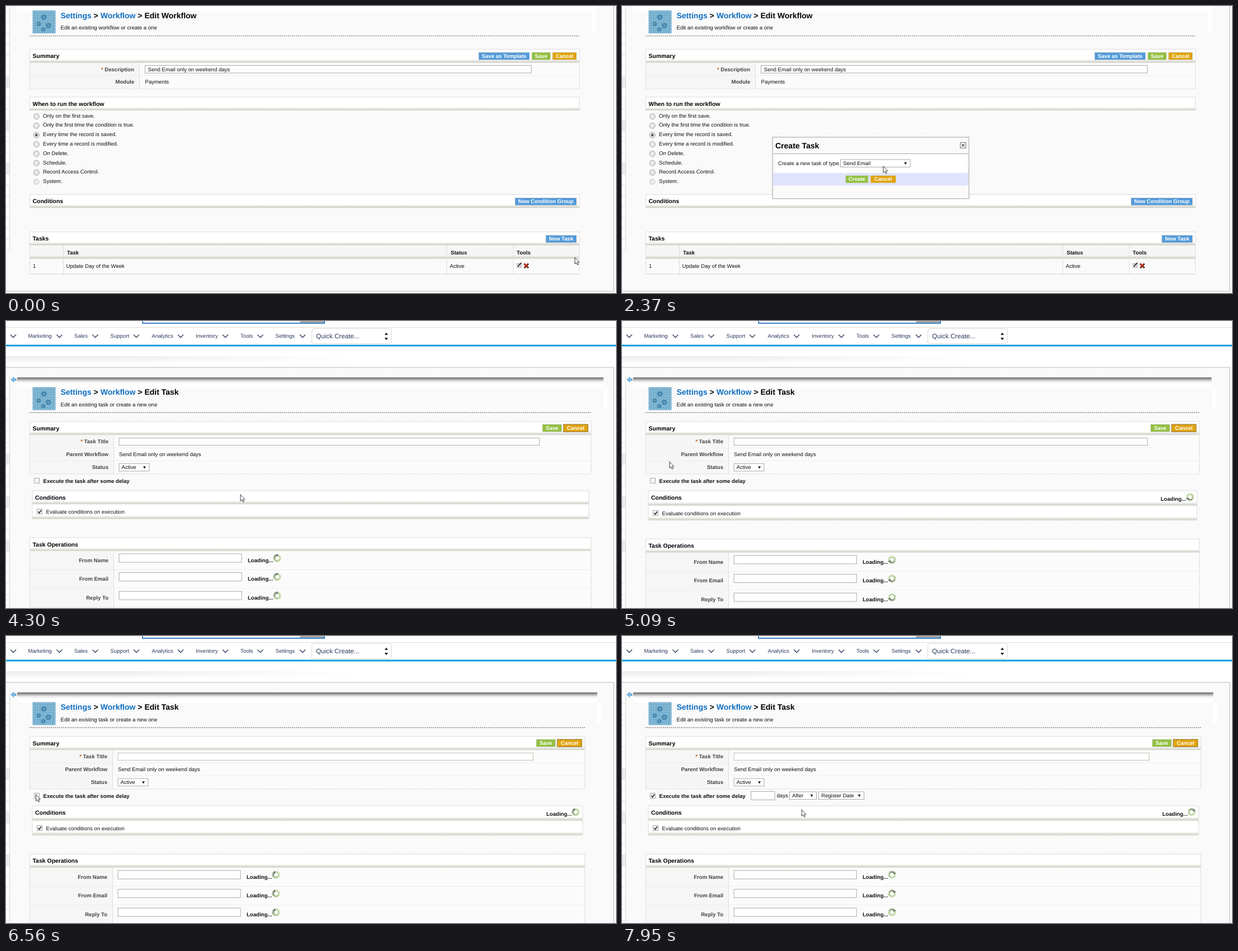
Write an HTML page that moves like this. It is 1090 px wide and 514 px high and loops after 8000 ms.

```html
<!DOCTYPE html>
<html lang="en">
<head>
<meta charset="utf-8">
<title>Workflow editor</title>
<style>
html, body { margin: 0; width: 100%; height: 100%; overflow: hidden; background: #fff; }
svg { display: block; width: 1090px; height: 514px; }
text { font: 9.6px "Liberation Sans", Arial, sans-serif; fill: #111; text-rendering: geometricPrecision; white-space: pre; }
.b { font-weight: bold; }
.h { font-weight: bold; font-size: 10.48px; fill: #000; }
.t { font-weight: bold; font-size: 14px; fill: #000; }
.link { fill: #0f6fc0; }
.lab { font-weight: bold; fill: #444; text-anchor: end; }
.btn { font-weight: bold; fill: #fff; text-anchor: middle; }
.nav { fill: #2b3a5c; }
.quick { font-size: 11.64px; fill: #2b3a5c; }

.anim > *, .on { animation: 8s step-end infinite; }
#flow { animation-name: flow; }
#task { animation-name: task; }
#dialog { animation-name: dialog; }
#menu { animation-name: menu; }
#fade { animation-name: fade; }
#wide { animation-name: wide; }
#narrow { animation-name: narrow; }
#final { animation-name: final; }
#delay { animation-name: delay; }
#cursor { animation: cursor 8s step-end infinite; }
.spin { animation: spin 1142.857ms steps(12) -271.43ms infinite; }

@keyframes flow { 0% { opacity: 1 } 53.75%, 100% { opacity: 0 } }
@keyframes task { 0% { opacity: 0 } 53.75%, 100% { opacity: 1 } }
@keyframes dialog { 0% { opacity: 0 } 9.5%, 100% { opacity: 1 } }
@keyframes menu { 0% { opacity: 0 } 21% { opacity: 1 } 26.75%, 100% { opacity: 0 } }
@keyframes fade { 0% { opacity: 0 } 38.25% { opacity: .12 } 39.5%, 100% { opacity: .25 } }
@keyframes wide { 0% { opacity: 1 } 56.625%, 100% { opacity: 0 } }
@keyframes narrow { 0% { opacity: 0 } 56.625% { opacity: 1 } 64.625%, 100% { opacity: 0 } }
@keyframes final { 0% { opacity: 0 } 64.625%, 100% { opacity: 1 } }
@keyframes delay { 0% { opacity: 0 } 86.875%, 100% { opacity: 1 } }
@keyframes spin { to { transform: rotate(360deg) } }
@keyframes cursor {
  0% { transform: translate(1016px, 450px) }
  .875% { transform: translate(1016px, 450px); animation-timing-function: steps(4, jump-start) }
  4.375% { transform: translate(995px, 419px) }
  5.625% { transform: translate(994.5px, 419px) }
  11.375% { transform: translate(994.5px, 419px); animation-timing-function: steps(8, jump-start) }
  19.09% { transform: translate(480px, 279.5px) }
  28.625% { transform: translate(480px, 279.5px); animation-timing-function: steps(9, jump-start) }
  37.34% { transform: translate(418.5px, 310.5px) }
  54.74% { transform: translate(418.5px, 310.5px); animation-timing-function: steps(10, jump-start) }
  64.625% { transform: translate(84.5px, 251.5px); animation-timing-function: steps(6, jump-start) }
  70.5% { transform: translate(33px, 268px); animation-timing-function: steps(5, jump-start) }
  75.25% { transform: translate(48px, 283.5px); animation-timing-function: steps(3, jump-start) }
  78.25% { transform: translate(53px, 283.5px) }
  96.5% { transform: translate(53px, 283.5px); animation-timing-function: steps(4, jump-start) }
  100% { transform: translate(320.5px, 310.5px) }
}
</style>
</head>
<body>
<svg viewBox="0 0 1090 514">
  <defs>
    <pattern id="hatch" width="3.5" height="3.5" patternUnits="userSpaceOnUse">
      <rect width="3.5" height="3.5" fill="#fcfcfc"/>
      <path d="M-1 -1L4.5 4.5" stroke="#f6f6f6"/>
    </pattern>
    <pattern id="grid" width="4.55" height="4.55" patternUnits="userSpaceOnUse">
      <rect width="4.55" height="4.55" fill="#5d9fc4"/>
      <path d="M.9 .9h2.7v2.7h-2.7z" fill="none" stroke="#a3cbe0" stroke-width=".9"/>
    </pattern>
    <linearGradient id="head" x2="0" y2="1">
      <stop offset=".74" stop-color="#fff"/><stop offset=".94" stop-color="#d2d2ca"/><stop offset="1" stop-color="#e9e9e5"/>
    </linearGradient>
    <linearGradient id="cell" x2="0" y2="1">
      <stop offset=".74" stop-color="#f6f6f6"/><stop offset=".94" stop-color="#d2d2ca"/><stop offset="1" stop-color="#e9e9e5"/>
    </linearGradient>
    <linearGradient id="bar" x2="0" y2="1">
      <stop offset="0" stop-color="#6c6c6c"/><stop offset=".2" stop-color="#a8a8a8"/><stop offset=".4" stop-color="#ececec"/><stop offset=".65" stop-color="#fff"/>
    </linearGradient>
    <linearGradient id="haze" x2="0" y2="1">
      <stop offset="0" stop-color="#ebebeb"/><stop offset="1" stop-color="#fff"/>
    </linearGradient>
    <linearGradient id="veil">
      <stop offset=".3" stop-color="#fff" stop-opacity="0"/><stop offset="1" stop-color="#fff"/>
    </linearGradient>
    <radialGradient id="knob">
      <stop offset=".3" stop-color="#ececec"/><stop offset="1" stop-color="#dcdcdc"/>
    </radialGradient>
  </defs>
  <g id="flow" class="on"></g>
  <g id="task" class="on"></g>
  <path id="cursor" d="M.5 .5V12l2.6-2.4 1.9 4.1 1.8-.8L5 9h3.4z" fill="#fff" stroke="#222" stroke-width=".9"/>
</svg>
<script>
const BLUE = '#539ad9', GREEN = '#92c040', GOLD = '#e0a30c';
const $ = id => document.getElementById(id);
const text = (x, y, s, cls = '') => `<text x="${x}" y="${y}" class="${cls}">${s}</text>`;
const rect = (x, y, w, h, fill, more = '') => `<rect x="${x}" y="${y}" width="${w}" height="${h}" fill="${fill}" ${more}/>`;
const box = (x, y, w, h, fill = '#fff', stroke = '#aaa') => rect(x, y, w, h, fill, `stroke="${stroke}"`);
const path = (d, stroke = '#ddd', more = '') => `<path d="${d}" fill="none" stroke="${stroke}" ${more}/>`;
const hline = (x, y, x2, c) => path(`M${x} ${y}H${x2}`, c);
const vline = (x, y, y2, c) => path(`M${x} ${y}V${y2}`, c);
const times = (n, f) => Array.from({ length: n }, (_, i) => f(i)).join('');

const button = (x, y, w, s, fill, edge = '#d4d4d4') =>
  box(x + .5, y + .5, w - 1, 13.5, fill, edge) + text(x + w / 2, y + 10, s, 'btn');

const header = (y, right, s, h = 24.5, x = 42.5) =>
  rect(x, y, right - x, h, 'url(#head)') +
  path(`M${x} ${y + h}V${y}H${right}V${y + h}`) + text(x + 5, y + 15.5, s, 'h');

const formRow = (y, h, col, right, label, labelY) =>
  rect(42.5, y, col - 42.5, h, '#f6f6f6') + rect(col, y, right - col, h, '#fbfbfb') +
  vline(col, y, y + h) + vline(42.5, y, y + h) + vline(right, y, y + h) +
  hline(42, y + h, right, '#e2e2e2') + text(col - 9.5, labelY, label, 'lab');

const select = (x, y, w, s) =>
  box(x, y, w, 13.5) + text(x + 4.5, y + 10, s) +
  `<path d="M${x + w - 11} ${y + 5}h5l-2.5 4.5z" fill="#222"/>`;

const check = (x, y, on) =>
  box(x, y, 9, 9, '#f4f4f4', '#aaa') + (on ? path(`M${x + 2} ${y + 4.5}l2 2.5 3.5-5`, '#333', 'stroke-width="1.7"') : '');

const radio = (y, on, dim) =>
  `<circle cx="54.3" cy="${y}" r="5.1" fill="url(#knob)" stroke="${dim ? '#d8d8d8' : '#aaa'}"/>` +
  (on ? `<circle cx="54.3" cy="${y}" r="2.3" fill="#555"/>` : '');

const spokes = times(12, i => {
  const tone = ['#35422f', '#a9c982', '#a9c982', '#b4d08f', '#a9c982', '#a3c27c', '#9dbd76', '#93b26d', '#86a263', '#738c57', '#5d7349', '#485a3b'][i];
  return `<path d="M0 -3.6V-7" stroke="${tone}" stroke-width="1.9" transform="rotate(${i * 30})"/>`;
});
const loading = (x, y) => text(x, y, 'Loading...', 'b') +
  `<g transform="translate(${x + 52.5} ${y - 7})"><g class="spin">${spokes}</g></g>`;

const gear = (x, y, r) => `<circle cx="${x}" cy="${y}" r="${r}" fill="#4588b0" stroke="#3f80a8" stroke-width="2" stroke-dasharray="1.6 1.2"/>` +
  `<circle cx="${x}" cy="${y}" r="${r / 3}" fill="#8fbfd8"/>`;
const title = (y, right, name, note) =>
  `<g transform="translate(47.5 ${y})">${rect(0, 0, 41, 41, 'url(#grid)')}${gear(20, 12, 4)}${gear(11, 24, 3.2)}${gear(28, 27, 4)}${gear(19, 34, 3)}</g>` +
  text(97.5, y + 13.8, `<tspan class="link">Settings</tspan> > <tspan class="link">Workflow</tspan> > ${name}`, 't') +
  text(97.5, y + 34, note) +
  path(`M42 ${y + 45.5}H${right}`, '#999', 'stroke-width="2" stroke-dasharray="1.8 1.7"');

// Table edge peeking in at the left; every fourth row is tinted
const sideRows = (top, count) => rect(0, top, 6, count * 19.4, '#fff') +
  times(count, i => ([7, 11, 15].includes(i) ? rect(0, top + i * 19.4, 6, 19.4, '#ececec') : '') +
    hline(0, top + (i + 1) * 19.4, 6, '#dedede')) + vline(6.5, top, top + count * 19.4, '#d6d6d6');

const flowPage = () => {
  const R = 1024.5, modes = ['Only on the first save.', 'Only the first time the condition is true.',
    'Every time the record is saved.', 'Every time a record is modified.', 'On Delete.', 'Schedule.',
    'Record Access Control.', 'System.'];
  const kinds = ['Send Email', 'Invoke Custom Function', 'Create Todo', 'Create Event', 'Update Fields',
    'Create Entity', 'Send SMS', 'Add Tag', 'Delete Tag', 'Run Report'];
  return rect(0, 0, 1090, 514, '#fff') + rect(0, 0, 1086, 511, 'url(#hatch)') +
    path('M1086 0V511H0', '#cfcfcf', 'stroke-width="1.6"') +
    rect(20, 0, 1027, 10, '#fff') + rect(1047, 0, 8, 47, '#fff') + sideRows(-9.5, 23) +
    title(8, 1025, 'Edit Workflow', 'Edit an existing workflow or create a one') +
    header(77.5, R, 'Summary') +
    button(844, 82.5, 92, 'Save as Template', BLUE) + button(939, 82.5, 34.5, 'Save', GREEN) + button(976, 82.5, 44, 'Cancel', GOLD) +
    formRow(102, 23, 238.5, R, '<tspan fill="#c0501a">*</tspan> Description', 116.5) + box(248.5, 106.5, 690, 13.5) +
    text(253.5, 116.8, 'Send Email only on weekend days') +
    formRow(125, 23, 238.5, R, 'Module', 139.3) + text(248.5, 139.3, 'Payments') +
    header(163, R, 'When to run the workflow') +
    modes.map((s, i) => radio(197.6 + i * 16.75, i == 2, i == 7) + text(66, 199.5 + i * 16.8, s)).join('') +
    header(337.5, R, 'Conditions') + button(909, 343, 111, 'New Condition Group', BLUE) +
    header(404.5, R, 'Tasks') + button(964, 410, 56, 'New Task', BLUE) +
    rect(42.5, 429, 982, 24, 'url(#cell)') + rect(42.5, 453, 982, 27, '#fafafa') +
    [42.5, 102.5, 787.5, 906.5, R].map(x => vline(x, 429, 480)).join('') + hline(42, 480, 1025, '#d4d4d4') +
    text(109, 444.8, 'Task', 'b') + text(794.5, 444.8, 'Status', 'b') + text(912.5, 444.8, 'Tools', 'b') +
    text(48, 469.3, '1') + text(107.5, 469.3, 'Update Day of the Week') + text(793, 469.3, 'Active') +
    box(913, 461.5, 7, 6.5, '#eee', '#999') + path('M915 467l1.5-3 4.5-4', '#333', 'stroke-width="2"') +
    path('M926 461.5l7.5 7.5M933.5 461.5l-7.5 7.5', '#4a1208', 'stroke-width="3"') +
    path('M926 461.5l6.5 6.5M932.5 461.5l-6.5 6.5', '#d8401c', 'stroke-width="1.6"') +
    `<g id="dialog" class="on">` +
      rect(269, 235, 351, 110, '#fafafa', 'stroke="#ccc" stroke-width="2"') +
      text(274, 254.6, 'Create Task', 't') +
      box(604.5, 244.5, 10, 10, '#fff', '#777') + path('M607 247l5 5M612 247l-5 5', '#555', 'stroke-width="1.4"') +
      hline(270, 264.5, 619, '#aaa') + rect(275, 266, 340, 33, '#fff') + rect(270, 299, 349, 22.5, '#e0e4fd') +
      text(279, 285, 'Create a new task of type') + select(390.5, 275, 124.5, 'Send Email') +
      button(399, 303, 41.5, 'Create', GREEN) +
    '</g>' +
    '<rect id="fade" class="on" width="1090" height="514" fill="#fff"/>' +
    `<g class="on" style="animation-name:dialog">${button(443.5, 303, 46.5, 'Cancel', GOLD)}</g>` +
    `<g id="menu" class="on">${box(390.5, 288.5, 124.5, 124, '#fff', '#888')}${rect(391, 289, 123.5, 12.3, '#1e90ff')}` +
      kinds.map((s, i) => `<text x="394" y="${298.6 + i * 12.3}"${i ? '' : ' style="fill:#fff"'}>${s}</text>`).join('') + '</g>';
};

const navBar = () => {
  const items = [['', 0, 13], ['Marketing', 39.5, 95.5], ['Sales', 122, 159.5], ['Support', 186.5, 233], ['Analytics', 260.5, 312],
    ['Inventory', 339, 392], ['Tools', 419, 454.5], ['Settings', 481.5, 530]];
  return rect(243, -5, 327, 10, '#3f82c4') + rect(245, -5, 323, 8, '#fff') + rect(525, -5, 43, 8, '#aaa') +
    hline(0, 11.5, 1090) +
    items.map(([s, x, v]) => text(x, 30.4, s, 'nav') + path(`M${v - 5} 24.5l5 5 5-5`, '#2b3a5c', 'stroke-width="1.3"')).join('') +
    rect(546.5, 13.5, 142, 27, '#fff', 'rx="3" stroke="#d8d8d8"') + text(554, 31, 'Quick Create...', 'quick') +
    '<path d="M676.5 25h6l-3-4.5zM676.5 30h6l-3 4.5z" fill="#222"/>' + rect(0, 42.5, 1090, 3, '#149bdb');
};

// One state of the task form: right edge, label column, extra height of the conditions block
const taskForm = (id, R, col, wait) => {
  const dy = wait ? 2.5 : 0, y2 = wait ? 3 : 0, x = col + 9.5, top = 412 + y2;
  const star = '<tspan fill="#c0501a">*</tspan> ';
  return `<g id="${id}" class="on">` + rect(20, 101, R + 2, 18, 'url(#bar)') +
    rect(R + 22.5, 119, 7, 38, '#fff') +
    title(118.5, R, 'Edit Task', 'Edit an existing task or create a new one') +
    header(180, R, 'Summary') + button(R - 87.5, 184.5, 35.5, 'Save', GREEN) + button(R - 50, 184.5, 45, 'Cancel', GOLD, '#8b7a55') +
    formRow(205, 23, col, R, star + 'Task Title', 219.3) + box(x, 209.5, R - 92.5 - x, 13, '#fff', id == 'final' ? '#bcc4b2' : '#aaa') +
    formRow(228, 23, col, R, 'Parent Workflow', 242) + text(x, 242, 'Send Email only on weekend days') +
    formRow(251, 23, col, R, 'Status', 265.3) + select(x, 255.3, 54, 'Active') +
    check(50.5, 281.5) + text(66.5, 289.6, 'Execute the task after some delay', 'b') +
    header(304, R - 4, 'Conditions', 24.5 + dy, 47) +
    (wait ? loading(R - 69, 322.3) : '') +
    rect(47, 329 + dy, R - 51, 26, 'url(#head)') + vline(47, 329, 354 + dy) + vline(R - 4, 329, 354 + dy) +
    check(55.5, 336.8 + dy, true) + text(71.5, 345 + dy, 'Evaluate conditions on execution') +
    header(388 + dy, R, 'Task Operations') +
    ['From Name', 'From Email', 'Reply To'].map((s, i) => {
      const y = top + i * 33.6;
      return formRow(y, 33.6, col, R, s, y + 19.6) + box(x, y + 5, 219, 15) + loading(x + 230, y + 19.6);
    }).join('') + formRow(top + 100.8, 33, col, R, '', 0) + '</g>';
};

const taskPage = () => rect(0, 0, 1090, 514, '#fff') +
  rect(0, 63, 620, 14, 'url(#haze)') + rect(0, 62, 622, 16, 'url(#veil)') + navBar() +
  rect(0, 83, 1086, 431, 'url(#hatch)') + path('M0 83H1086V514', '#cfcfcf', 'stroke-width="1.6"') +
  sideRows(101.5, 23) + '<path d="M9 105l4.5-4.5v2.7h4.5v3.6h-4.5v2.7z" fill="#7bbde6" stroke="#3a8cc4" stroke-width=".8"/>' +
  taskForm('wide', 1045.5, 192.5, false) + taskForm('narrow', 1031.5, 190.5, true) + taskForm('final', 1034.5, 190.5, true) +
  `<g id="delay" class="on">${check(50.5, 281.5, true)}${box(230.5, 278.5, 42.5, 15)}${text(276.5, 289.4, 'days')}` +
  select(299.5, 279, 48, 'After') + select(351.5, 279, 81, 'Register Date') + '</g>';

$('flow').innerHTML = flowPage();
$('task').innerHTML = taskPage();
</script>
</body>
</html>
```
